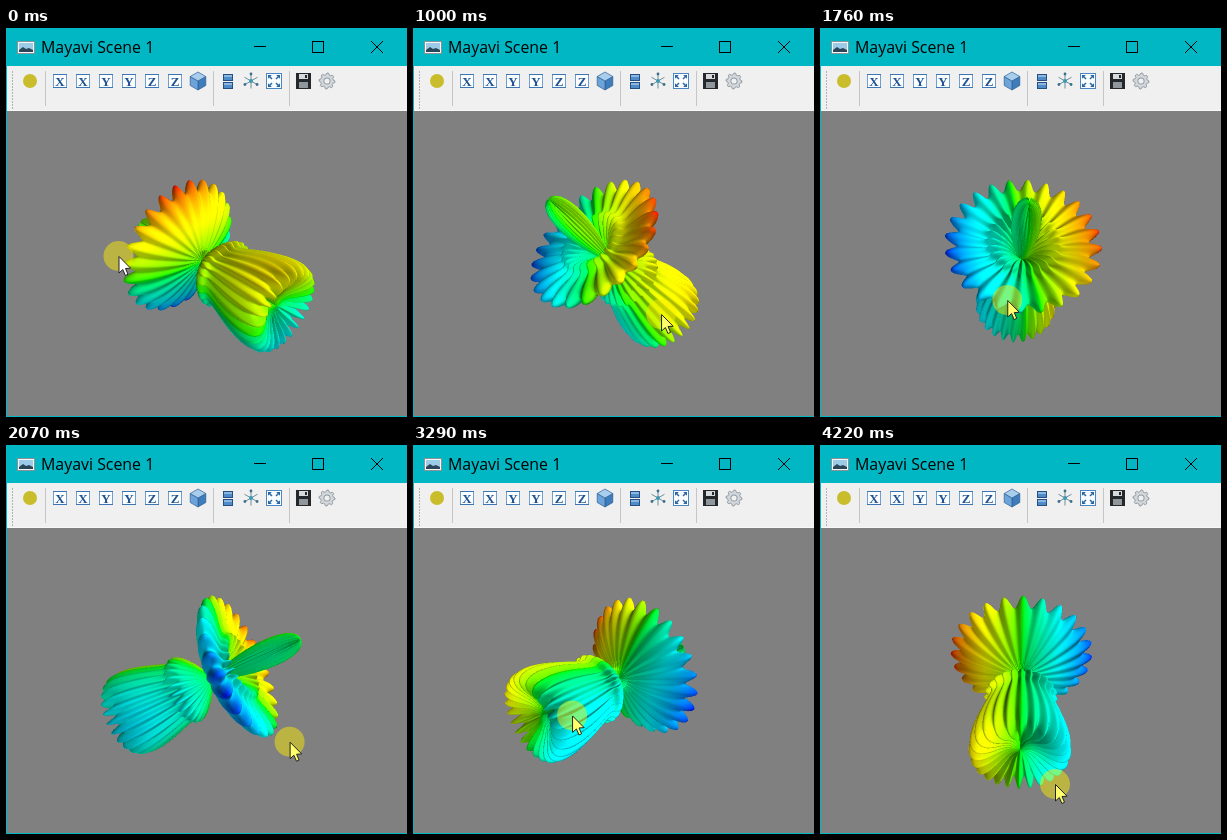
Write an HTML page with a canvas that moves like this. It is 401 px wide and 389 px high and loops after 4300 ms.

```html
<!DOCTYPE html>
<html lang="en">
<head>
<meta charset="utf-8">
<title>Mayavi Scene 1</title>
<style>
html, body { margin: 0; width: 100%; height: 100%; overflow: hidden; background: #808080; }
canvas { position: absolute; left: 0; top: 0; width: 401px; height: 389px; }
#title {
  position: absolute; left: 35px; top: 8px; white-space: pre;
  font: 15.9px/22px "Open Sans", "Noto Sans", sans-serif; color: #000;
}
</style>
</head>
<body>
<canvas id="stage" width="401" height="389"></canvas>
<div id="title">Mayavi Scene 1</div>
<script>
const LOOP = 4300, STEPS = 56, STEP = LOOP / STEPS;
const ctx = document.getElementById('stage').getContext('2d');
const { sin, cos, min, max, PI } = Math;
const rad = d => d * PI / 180;
const clamp = (v, hi) => max(0, min(hi, v));

// ---- vectors ----
const dot = (p, q) => p[0] * q[0] + p[1] * q[1] + p[2] * q[2];
const cross = (p, q) => [p[1] * q[2] - p[2] * q[1], p[2] * q[0] - p[0] * q[2], p[0] * q[1] - p[1] * q[0]];
const unit = p => { const l = Math.hypot(...p) || 1; return p.map(v => v / l); };
// linear track; each key is [position, ...values]
function track(keys, at) {
  let i = 0;
  while (i < keys.length - 2 && keys[i + 1][0] <= at) i++;
  const [p, q] = [keys[i], keys[i + 1]], u = clamp((at - p[0]) / (q[0] - p[0]), 1);
  return p.slice(1).map((v, k) => v + (q[k + 1] - v) * u);
}

// ---- motion ----
// pointer: time, x, y; strokes to the right (and the last one) drag the body
const MOUSE = [[0, 112.5, 228], [614, 161, 273], [1320, 321, 297], [1690, 187, 272], [2170, 308, 303],
  [2530, 163, 262], [2850, 236, 282], [3240, 156, 270], [3840, 348, 290], [4223, 235, 339]];
// dragged distance, tilt and spin in degrees
const POSE = [[0, 25.5, 59], [48, 36.5, 40], [205, 31, 9], [305, 22, 24], [350, 23, 23],
  [422, 19.6, 43], [594, 25, 28], [707, 43, 2]];
const START = 51, GAIN = .64;

function axes(t) {
  let shift = 0, dist = 0;
  for (let i = 1; i < MOUSE.length && MOUSE[i - 1][0] < t; i++) {
    const dx = track(MOUSE, min(t, MOUSE[i][0]))[0] - MOUSE[i - 1][1];
    if (dx < 0 && i < MOUSE.length - 1) continue;
    shift += dx;
    dist += Math.abs(dx);
  }
  const [tilt, spin] = track(POSE, dist).map(rad), h = rad(START + GAIN * shift);
  const y = [sin(h) * cos(tilt), -sin(tilt), cos(h) * cos(tilt)];
  const side = [-cos(h), 0, sin(h)];
  const up = [sin(h) * sin(tilt), cos(tilt), cos(h) * sin(tilt)];
  const z = side.map((v, k) => v * cos(spin) + up[k] * sin(spin));
  return [cross(y, z), y, z];
}

// ---- surface ----
const NP = 120, NT = 288, COLS = NT + 1, COUNT = (NP + 1) * COLS, ZMAX = 1.54, MID = .13;
function point(phi, th) {
  const r = sin(4 * phi) ** 3 + cos(2 * phi) ** 3 + sin(6 * th) ** 2 + cos(6 * th) ** 4;
  return [r * sin(phi) * cos(th), r * cos(phi), r * sin(phi) * sin(th)];
}
// blue to red through the hues, with a square-root ramp per channel
function rainbow(v) {
  const h = clamp(2 - 2 * v, 4);
  return [2 - h, min(h, 4 - h), h - 2].map(c => 255 * Math.sqrt(clamp(c, 1)));
}
const pos = [], nor = [], tint = [];
for (let i = 0; i <= NP; i++) for (let j = 0; j <= NT; j++) {
  const e = .002, phi = max(2 * e, min(PI - 2 * e, i * PI / NP)), th = j * 2 * PI / NT;
  const p = point(phi, th);
  const diff = (a, b) => a.map((v, k) => (v - b[k]) / e);
  pos.push(p);
  nor.push(unit(cross(diff(point(phi + e, th), point(phi - e, th)), diff(point(phi, th + e), point(phi, th - e)))));
  tint.push(rainbow(p[2] / ZMAX));
}

// ---- renderer ----
const SS = 2, W = 400 * SS, H = 305 * SS, DIST = 11.78, FOCAL = 569 * SS;
// elevation, azimuth, strength
const LIGHTS = [[45, 45, 1], [-30, -60, .6], [-30, 60, .5]].map(([el, az, s]) =>
  [s * cos(rad(el)) * sin(rad(az)), s * sin(rad(el)), s * cos(rad(el)) * cos(rad(az))]);
const big = document.createElement('canvas');
big.width = W; big.height = H;
const bigCtx = big.getContext('2d'), img = bigCtx.createImageData(W, H);
const depth = new Float32Array(W * H), pix = new Uint32Array(img.data.buffer);
const sx = new Float32Array(COUNT), sy = new Float32Array(COUNT), sw = new Float32Array(COUNT);
const rgb = new Float32Array(COUNT * 3);

function project([b, a, c]) {
  const turn = p => [0, 1, 2].map(k => p[0] * b[k] + p[1] * a[k] + p[2] * c[k]);
  for (let i = 0; i < COUNT; i++) {
    const [px, py, pz] = pos[i];
    const [x, y, z] = turn([px, py - MID, pz]);
    const w = 1 / (DIST - z);
    sx[i] = W / 2 + x * FOCAL * w;
    sy[i] = H / 2 - y * FOCAL * w;
    sw[i] = w;
    let n = turn(nor[i]);
    if (dot(n, [-x, -y, DIST - z]) < 0) n = n.map(v => -v);
    let lit = 0;
    for (const l of LIGHTS) lit += max(0, dot(n, l));
    for (let k = 0; k < 3; k++) rgb[i * 3 + k] = min(255, tint[i][k] * lit);
  }
}

function triangle(a, b, c) {
  const ax = sx[a], ay = sy[a], bx = sx[b], by = sy[b], cx = sx[c], cy = sy[c];
  const area = (bx - ax) * (cy - ay) - (by - ay) * (cx - ax);
  if (Math.abs(area) < 1e-6) return;
  const x0 = max(0, Math.ceil(min(ax, bx, cx) - .5)), x1 = min(W - 1, Math.floor(max(ax, bx, cx) - .5));
  const y0 = max(0, Math.ceil(min(ay, by, cy) - .5)), y1 = min(H - 1, Math.floor(max(ay, by, cy) - .5));
  for (let y = y0; y <= y1; y++) for (let x = x0; x <= x1; x++) {
    const px = x + .5, py = y + .5;
    const u = ((bx - px) * (cy - py) - (by - py) * (cx - px)) / area;
    const v = ((cx - px) * (ay - py) - (cy - py) * (ax - px)) / area;
    const w = 1 - u - v;
    if (min(u, v, w) < -1e-5) continue;
    const d = u * sw[a] + v * sw[b] + w * sw[c], o = y * W + x;
    if (d <= depth[o]) continue;
    depth[o] = d;
    const ch = k => clamp(u * rgb[a * 3 + k] + v * rgb[b * 3 + k] + w * rgb[c * 3 + k], 255) | 0;
    pix[o] = 0xff000000 | ch(2) << 16 | ch(1) << 8 | ch(0);
  }
}

function renderBody(t) {
  depth.fill(0);
  pix.fill(0xff808080);
  project(axes(t));
  for (let i = 0; i < NP; i++) for (let j = 0; j < NT; j++) {
    const o = i * COLS + j;
    triangle(o, o + 1, o + COLS);
    triangle(o + 1, o + COLS + 1, o + COLS);
  }
  bigCtx.putImageData(img, 0, 0);
  const out = document.createElement('canvas');
  out.width = W / SS; out.height = H / SS;
  const g = out.getContext('2d');
  g.imageSmoothingQuality = 'high';
  g.drawImage(big, 0, 0, W / SS, H / SS);
  return out;
}

// ---- window ----
function box(x, y, w, h, fill, line) {
  if (fill) { ctx.fillStyle = fill; ctx.fillRect(x, y, w, h); }
  if (line) { ctx.strokeStyle = line; ctx.lineWidth = 1; ctx.strokeRect(x + .5, y + .5, w - 1, h - 1); }
}
function poly(pts, fill, line, width = 1) {
  ctx.beginPath();
  pts.forEach(([x, y]) => ctx.lineTo(x, y));
  if (fill) { ctx.closePath(); ctx.fillStyle = fill; ctx.fill(); }
  if (line) { ctx.strokeStyle = line; ctx.lineWidth = width; ctx.stroke(); }
}
function disc(x, y, r, fill) {
  ctx.beginPath();
  ctx.arc(x, y, r, 0, 7);
  ctx.fillStyle = fill;
  ctx.fill();
}
const around = (n, x, y, r, from = 0) => Array.from({ length: n }, (_, i) => {
  const a = from + i * 2 * PI / n, l = typeof r === 'function' ? r(i) : r;
  return [x + l * cos(a), y + l * sin(a)];
});

function drawTitleBar() {
  box(0, 0, 401, 389, '#00b7c3');
  box(11, 13, 18, 13, '#f4f6f8', '#8a9299');
  box(13, 15, 14, 9, '#9ccbe8');
  poly([[13, 24], [13, 22], [17, 19], [20, 21], [23, 20], [27, 22], [27, 24]], '#2b4558');
  box(248, 18, 12, 1, '#000');
  box(306, 13, 12, 12, null, '#000');
  for (const s of [-1, 1]) poly([[371 - 6 * s, 13], [371 + 6 * s, 25]], null, '#000');
}

function drawCube(x, y) {
  const hex = around(6, x, y, 9, -PI / 2), mid = [x, y];
  ['#3f7cbb', '#6ca3d8', '#a9cdec'].forEach((fill, i) =>
    poly([mid, ...[1, 2, 3].map(k => hex[(2 * i + k) % 6])], fill, '#2c5f96', .7));
}

function drawToolbar() {
  box(1, 38, 400, 45, '#f0f0f0');
  box(1, 82, 400, 1, '#f8f8f8');
  for (let y = 43; y < 80; y += 3) box(6, y, 1, 2, '#b4b4b4');
  for (const x of [39, 207, 283]) box(x, 43, 1, 35, '#c6c6c6');
  disc(24, 53, 7, '#c9bd2c');

  ctx.font = 'bold 13px "Liberation Serif", "Noto Serif", serif';
  ctx.textAlign = 'center';
  [...'XXYYZZ'].forEach((s, i) => {
    const x = 47 + Math.round(i * 22.9);
    box(x, 46, 14, 14, '#fdfeff', '#6f9fce');
    for (const y of [46, 59]) box(x, y, 14, 1, '#3d76b5');
    ctx.fillStyle = '#1f5391';
    ctx.fillText(s, x + 7, 57.5);
  });
  drawCube(192, 53);

  for (const y of [46, 54]) {
    box(217, y, 10, 7, '#4d8cc9', '#244f80');
    box(218, y + 1, 8, 2, '#8ab8e0');
  }

  around(6, 245, 53, 7.5, -PI / 2).forEach(p => poly([[245, 53], p], null, '#6f8e9c', 1));
  around(3, 245, 53, 7, -PI / 2).forEach(([x, y]) => disc(x, y, 1.4, '#3c6f8c'));
  disc(245, 53, 2, '#3a9ab0');

  box(260, 45, 16, 16, '#fafdff', '#4a86c2');
  for (const i of [-1, 1]) for (const j of [-1, 1]) {
    const at = (x, y) => [268 + i * x, 53 + j * y];
    poly([at(2, 2), at(5, 5)], null, '#2a65a4', 1.5);
    poly([at(6, 6), at(2.2, 6), at(6, 2.2)], '#2a65a4');
  }

  box(290, 45, 15, 16, '#25282b');
  box(293, 46, 9, 5, '#d7dadd');
  box(299, 47, 2, 3, '#25282b');
  box(293, 54, 9, 6, '#8f969c');

  const gear = around(32, 321, 53, i => i % 4 < 2 ? 8 : 6.2);
  poly([...gear, gear[0]], '#d3d8dc', '#8b949b', .9);
  disc(321, 53, 3.6, '#929ba2');
  disc(321, 53, 2.6, '#f0f0f0');
}

function drawPointer(t) {
  const [x, y] = track(MOUSE, t);
  disc(x, y, 15, 'rgba(250,236,0,.48)');
  const arrow = [[0, 0], [0, 16.5], [3.8, 13], [6.4, 19], [9, 17.8], [6.5, 12], [11.6, 11.7], [0, 0]];
  poly(arrow.map(([i, j]) => [x + i + .5, y + j + .5]), t ? '#ffff6c' : '#fff', '#222');
}

const bodies = [];
let shown = -1;
function draw(now) {
  const k = Math.floor((now % LOOP + 5) / STEP) % STEPS;
  if (k === shown) return;
  shown = k;
  const t = k * STEP;
  bodies[k] = bodies[k] || renderBody(t);
  drawTitleBar();
  drawToolbar();
  ctx.drawImage(bodies[k], 1, 83);
  drawPointer(t);
}
const start = performance.now();
function tick() {
  draw(performance.now() - start);
  requestAnimationFrame(tick);
}
tick();
</script>
</body>
</html>
```
